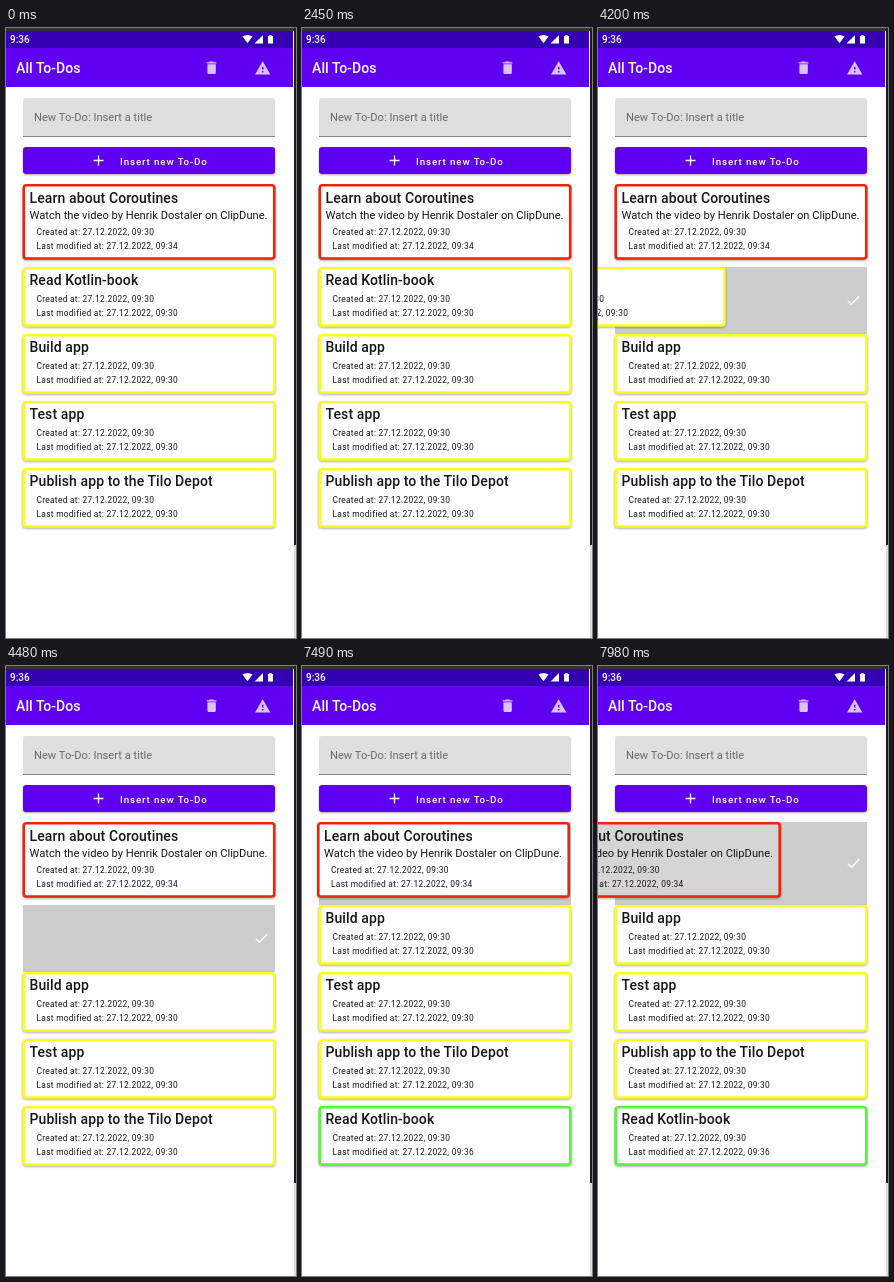
Recreate the animation shown at these times as an HTML page. Size 290 by 610 pixels, loop 8000 ms.

```html
<!DOCTYPE html>
<html lang="en">
<head>
<meta charset="utf-8">
<title>All To-Dos</title>
<style>
  html, body { margin: 0; width: 100%; height: 100%; overflow: hidden; background: #fff; }
  svg { display: block; font-family: Roboto, sans-serif; }
  .h6 { font-size: 14px; font-weight: 500; letter-spacing: .1px; }
  .body { font-size: 11.15px; }
  .caption { font-size: 8.4px; letter-spacing: .29px; }
  .button { font-size: 9.8px; font-weight: 500; letter-spacing: .87px; }
  .clock { font-size: 10px; font-weight: 500; }
  .raised { filter: drop-shadow(0 1.5px 1.2px rgba(0, 0, 0, .34)); }
</style>
</head>
<body>
<svg id="stage" width="290" height="610" viewBox="0 0 290 610">
  <rect width="290" height="610" fill="#fff"/>
  <rect width="290" height="3" fill="#333"/>
  <rect x="288" width="2" height="517" fill="#1c1c1c"/>
  <rect x="288" y="517" width="2" height="93" fill="#ddd"/>

  <rect y="3" width="287" height="17" fill="#3500b3"/>
  <rect y="20" width="287" height="39" fill="#5f00f2"/>
  <g fill="#fff">
    <text class="clock" x="4" y="15">9:36</text>
    <path d="M236.5 8.6Q241.5 5.4 246.5 8.6L241.5 15.2ZM257 7V15.5H248.5ZM262 8H263.3V7H265.7V8H267V15.5H262Z"/>
    <text class="h6" x="10" y="45">All To-Dos</text>
    <g opacity=".76">
      <path transform="translate(197.2 31.4) scale(.7)" d="M6 19c0 1.1.9 2 2 2h8c1.1 0 2-.9 2-2V7H6zM19 4h-3.5l-1-1h-5l-1 1H5v2h14z"/>
      <path transform="translate(248.3 31.8) scale(.7)" d="M1 21h22L12 2zm12-3h-2v-2h2zm0-4h-2v-4h2z"/>
    </g>
  </g>

  <path d="M17 109V73Q17 70 20 70H266Q269 70 269 73V109Z" fill="#dfdfdf"/>
  <rect x="17" y="108" width="252" height="1" fill="#858585"/>
  <text class="body" x="28" y="93" fill="#6a6a6a">New To-Do: Insert a title</text>

  <rect class="raised" x="17" y="119" width="252" height="27" rx="3" fill="#5f00f2"/>
  <path d="M87.5 132.5H97.5M92.5 127.5V137.5" stroke="#fff" stroke-width="1.3"/>
  <text class="button" x="114" y="136.5" fill="#fff">Insert new To-Do</text>
</svg>
<script>
const stage = document.getElementById('stage');
const LOOP = 8000, STEP = 70, ROW = 67, LIST_TOP = 239;
const RED = '#ee2408', YELLOW = '#fdfd1c', GREEN = '#56f53c';

function addGroup(markup) {
  const g = document.createElementNS('http://www.w3.org/2000/svg', 'g');
  g.innerHTML = markup;
  return stage.appendChild(g);
}

// Grey row with a check mark, revealed by swiping a card away
function addBackdrop(y, height) {
  return addGroup(`<rect x="17" y="${y}" width="252" height="${height}" fill="#ccc"/>
    <path transform="translate(247 ${y + height / 2 - 8.6}) scale(.7)" fill="#fff"
      d="M9 16.17L4.83 12l-1.42 1.41L9 19 21 7l-1.41-1.41z"/>`);
}

function addCard(color, title, modified = '09:30', note = '') {
  const extra = note ? 16 : 0;
  const line = (style, x, y, text) => `<text class="${style}" x="${x}" y="${y}" fill="#161616">${text}</text>`;
  return addGroup(`<rect class="raised" x="17.8" y="1.3" width="250.4" height="${57.2 + extra}" rx="2.5"
      fill="#fff" stroke="${color}" stroke-width="2.6"/>` +
    line('h6', 23.5, note ? 18.7 : 18, title) +
    line('body', 23.5, 35, note) +
    line('caption', 30.5, 35 + extra, 'Created at: 27.12.2022, 09:30') +
    line('caption', 30.5, 49 + extra, `Last modified at: 27.12.2022, ${modified}`));
}

const learnBackdrop = addBackdrop(156, 83);
const readBackdrop = addBackdrop(LIST_TOP, ROW);
const others = ['Build app', 'Test app', 'Publish app to the Tilo Depot'].map(title => addCard(YELLOW, title));
const done = addCard(GREEN, 'Read Kotlin-book', '09:36');
const read = addCard(YELLOW, 'Read Kotlin-book');
const learn = addCard(RED, 'Learn about Coroutines', '09:34',
  'Watch the video by Henrik Dostaler on ClipDune.');
const learnFill = learn.querySelector('rect');

const place = (el, x, y) => el.setAttribute('transform', `translate(${x} ${y})`);
const show = (el, visible) => el.setAttribute('visibility', visible ? 'visible' : 'hidden');

// Swipes advance in discrete steps; 0 means not started
const swipeStep = (t, start, last) => Math.max(0, Math.min(last, Math.floor((t - start) / STEP) + 1));

function render(now) {
  const t = now % LOOP;
  const moved = t >= 5040;
  const readStep = swipeStep(t, 3780, 11);
  const learnStep = swipeStep(t, 7490, 8);

  place(read, -5.5 * readStep ** 1.67, LIST_TOP);
  show(read, !moved);
  show(readBackdrop, readStep > 0 && !moved);

  others.forEach((card, i) => place(card, 0, LIST_TOP + ROW * (i + (moved ? 0 : 1))));
  place(done, 0, LIST_TOP + ROW * 3);
  show(done, moved);

  place(learn, -1.5 * learnStep ** 1.95, 156);
  show(learnBackdrop, learnStep > 0);
  const shade = 255 - 6 * Math.max(0, learnStep - 1);
  learnFill.setAttribute('fill', `rgb(${shade},${shade},${shade})`);
}

function tick() {
  render(performance.now());
  requestAnimationFrame(tick);
}
tick();
</script>
</body>
</html>
```
